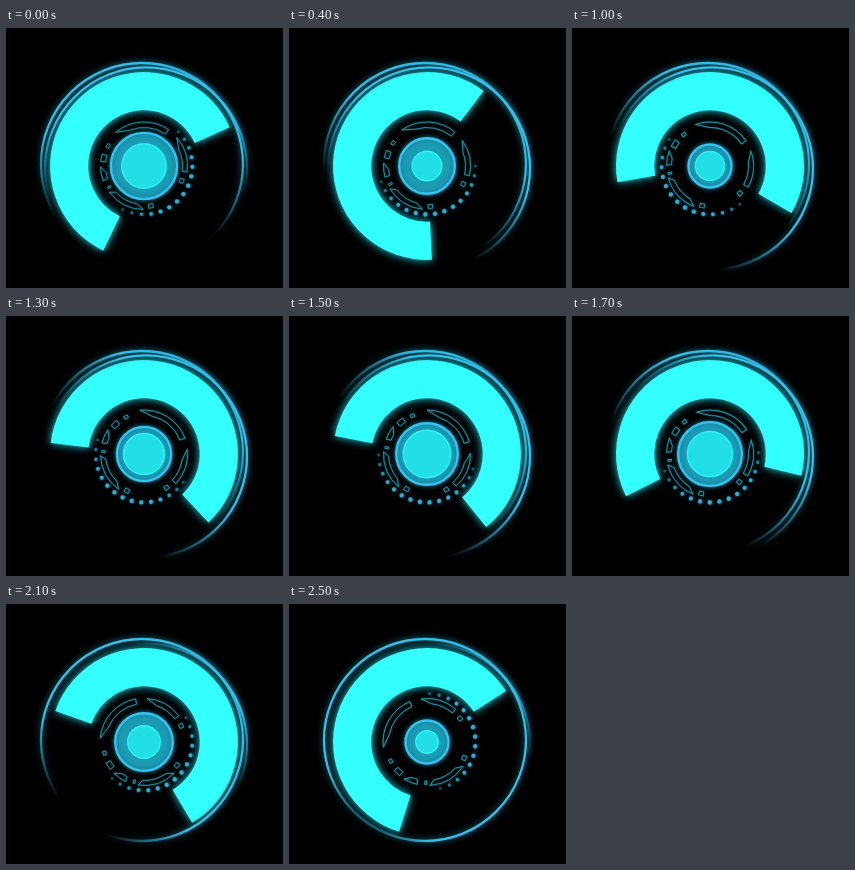
These frames come from a looping animation (277 px wide and 260 px high, 2600 ms). An HTML page with a canvas:

```html
<!DOCTYPE html>
<html lang="en">
<head>
<meta charset="utf-8">
<title>HUD dial</title>
<style>
  html, body { margin: 0; width: 100%; height: 100%; overflow: hidden; background: #000; }
  canvas { display: block; width: 277px; height: 260px; }
</style>
</head>
<body>
<canvas id="dial"></canvas>
<script>
const LOOP = 2600, STEP = 100, W = 277, H = 260, C = 138;
const RAD = Math.PI / 180, TAU = Math.PI * 2;
const canvas = document.getElementById('dial');
const ratio = window.devicePixelRatio || 1;
canvas.width = W * ratio;
canvas.height = H * ratio;
const ctx = canvas.getContext('2d');

// Key poses, joined by smooth curves without overshoot
const times = [0, 400, 1000, 1500, 1900, 2100, 2500];
const tracks = {
  sector:    [0.7, -28, 55, 76, 0.7, 84.2, -7.8],
  dots:      [0, 45, 97, 63, 25, 15, -42],
  marks:     [0, 5, 21, 40, -10, -45, -57],
  rim:       [34.3, 29, 22.7, 32, 33.5, 30, 22.7],
  core:      [23, 15.5, 15.3, 24.5, 21, 17, 12],
  ringStart: [148, 175, 195, 212, 170, 145, 115],
  ringEnd:   [405, 415, 400, 405, 460, 472, 495],
  arcStart:  [160, 178, 202, 210, 235, 262, 270],
  arcEnd:    [375, 424, 446, 438, 402, 388, 368]
};

function curve(values) {
  const last = values.length - 1;
  const slope = i => (values[i + 1] - values[i]) / (times[i + 1] - times[i]);
  const tangent = i => {
    if (i === 0) return slope(0);
    if (i === last) return slope(last - 1);
    const a = slope(i - 1), b = slope(i);
    return a * b > 0 ? 2 * a * b / (a + b) : 0;
  };
  return t => {
    let i = 0;
    while (i < last - 1 && t >= times[i + 1]) i++;
    const span = times[i + 1] - times[i];
    const u = Math.min(1, (t - times[i]) / span), v = 1 - u;
    return values[i] * (1 + 2 * u) * v * v + values[i + 1] * u * u * (3 - 2 * u)
      + span * u * v * (tangent(i) * v - tangent(i + 1) * u);
  };
}
const curves = Object.entries(tracks).map(([name, values]) => [name, curve(values)]);

function glow(color, blur) {
  ctx.shadowColor = color;
  ctx.shadowBlur = blur * ratio;
}

function turned(deg, draw) {
  ctx.save();
  ctx.translate(C, C);
  ctx.rotate(deg * RAD);
  draw();
  ctx.restore();
}

// The line lies inside radius r
function disc(r, fill, stroke, width) {
  ctx.beginPath();
  ctx.arc(C, C, r - width / 2, 0, TAU);
  ctx.fillStyle = fill;
  ctx.fill();
  ctx.strokeStyle = stroke;
  ctx.lineWidth = width;
  ctx.stroke();
}

// Circle line that fades out at both ends
function fadingRing(x, y, start, end) {
  const fade = 50, n = 90;
  const clamp = v => Math.max(0, Math.min(1, v));
  const grad = ctx.createConicGradient(0, x, y);
  for (let i = 0; i <= n; i++) {
    let alpha = 0;
    for (let a = i * 360 / n; a < 720; a += 360) {
      alpha += clamp((a - start) / fade) * clamp((end - a) / fade);
    }
    grad.addColorStop(i / n, `rgba(52, 192, 234, ${clamp(alpha)})`);
  }
  ctx.save();
  glow('#1592b0', 6);
  ctx.beginPath();
  ctx.arc(x, y, 101, 0, TAU);
  ctx.strokeStyle = grad;
  ctx.lineWidth = 2.3;
  ctx.stroke();
  ctx.restore();
}

function drawSector() {
  ctx.beginPath();
  ctx.arc(0, 0, 94, 115 * RAD, 335 * RAD);
  ctx.arc(0, 0, 55.7, 335 * RAD, 115 * RAD, true);
  ctx.closePath();
  glow('#19d8e8', 9);
  ctx.fillStyle = '#33ffff';
  ctx.fill();
}

function drawDots() {
  const n = 15;
  ctx.fillStyle = '#2eaed6';
  glow('#1688a8', 3);
  for (let i = 0; i < n; i++) {
    const a = (-45 + i * 11.5) * RAD;
    const swell = Math.sin(Math.PI * (i + 0.6) / n);
    ctx.globalAlpha = Math.min(1, 0.3 + swell);
    ctx.beginPath();
    ctx.arc(48.4 * Math.cos(a), 48.4 * Math.sin(a), 1.4 + 0.8 * swell, 0, TAU);
    ctx.fill();
  }
}

// Outlined band; the inner edge may be cut short at either end
function band(from, to, inner, outer, cutFrom = 0, cutTo = 0) {
  ctx.beginPath();
  ctx.arc(0, 0, outer, from * RAD, to * RAD);
  ctx.arc(0, 0, inner, (to - cutTo) * RAD, (from + cutFrom) * RAD, true);
  ctx.closePath();
  ctx.stroke();
}

function drawMarks() {
  ctx.strokeStyle = '#1b9aac';
  ctx.lineWidth = 0.9;
  glow('#0d6f80', 2);
  band(-130, -56, 38.5, 44, 18, 0);
  band(-41, 8, 38.5, 43.5, 15, 0);
  band(18.5, 24.5, 38.5, 42.5);
  band(77, 83.5, 38.5, 42.5);
  band(91, 143, 38.5, 43.5, 9, 6);
  band(147.5, 150, 39, 42.5);
  band(160, 179, 38.5, 43.5, 1, 9);
  band(186, 196, 38.5, 43.5);
  band(206.5, 212, 39.5, 42.5);
}

function draw(t) {
  const p = {};
  for (const [name, at] of curves) p[name] = at(t);
  ctx.setTransform(ratio, 0, 0, ratio, 0, 0);
  ctx.fillStyle = '#000';
  ctx.fillRect(0, 0, W, H);

  turned(p.sector, drawSector);
  fadingRing(136, 136, p.ringStart, p.ringEnd);
  fadingRing(140, 140.4, p.arcStart, p.arcEnd);
  turned(p.marks, drawMarks);
  turned(p.dots, drawDots);

  ctx.save();
  glow('#12758c', 5);
  disc(p.rim, '#1c9bb5', '#34c4f0', 2.4);
  ctx.restore();
  disc(p.core, '#22dfe6', '#30f2f4', 1.4);
}

const begin = performance.now();
let shown = -1;
function tick() {
  const now = Math.max(0, performance.now() - begin) % LOOP;
  const t = Math.floor(now / STEP) * STEP;
  if (t !== shown) draw(shown = t);
  requestAnimationFrame(tick);
}
tick();
</script>
</body>
</html>
```
